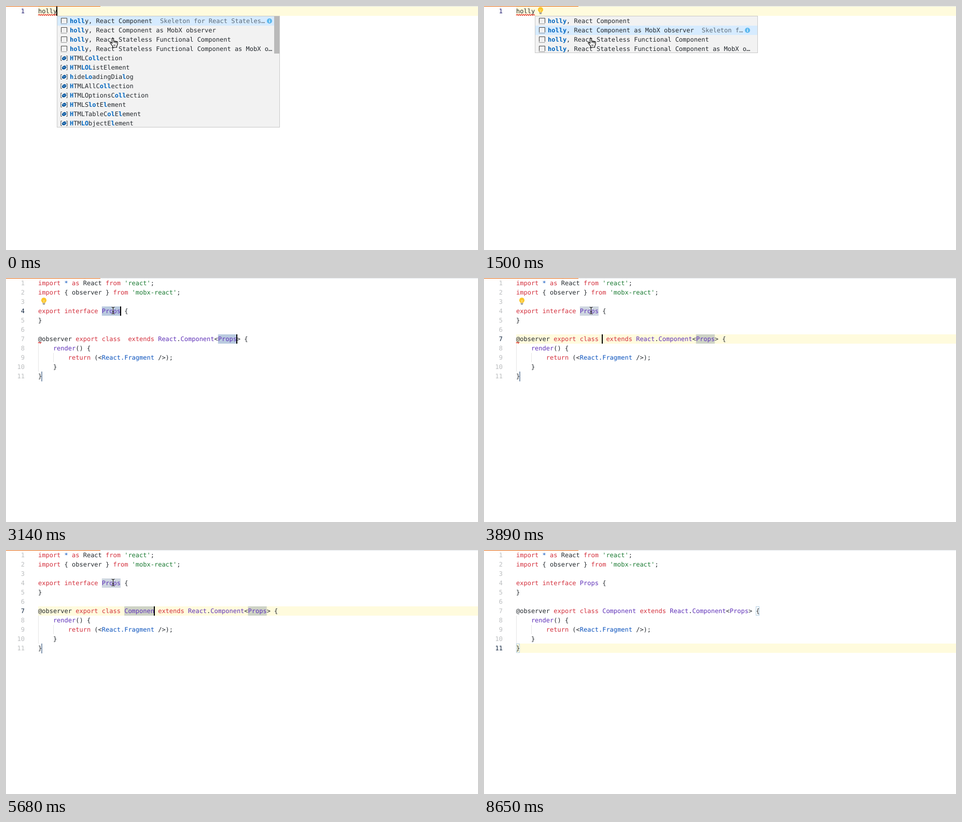
Recreate the animation shown at these times as an HTML page with a canvas. Size 910 by 472 pixels, loop 8.75 s.

```html
<!DOCTYPE html>
<html lang="en">
<head>
<meta charset="utf-8">
<title>Snippet completion</title>
<style>
html, body { margin: 0; width: 100%; height: 100%; overflow: hidden; background: #fff; }
canvas { display: block; }
</style>
</head>
<body>
<canvas id="stage" width="910" height="472"></canvas>
<script>
const ctx = document.getElementById('stage').getContext('2d');
ctx.textRendering = 'geometricPrecision';

const LOOP = 8750, LEFT = 62, ROW = 18, CHAR = 7.224;
const FONT = '12px "DejaVu Sans Mono", monospace';
const COLORS = {
  k: '#24292e', r: '#d32f3c', g: '#1a7a32', p: '#5f32b8', b: '#0a52bd',
  B: '#0066bf', d: '#5d6b78', n: '#bcbec0', a: '#10253f', i: '#1f1a6e'
};

// Moments at which the caret switches between shown and hidden
const BLINKS = [600, 1050, 1500, 2100, 2550, 2840, 3290, 3890, 4340, 4640,
  6880, 7470, 7920, 8370, 8650];
const KEYS = [[4640, 1], [4790, 2], [4940, 3], [5090, 4], [5240, 5],
  [5530, 6], [5680, 8], [5830, 9]];
const MOUSE = [[0, [206, 63]], [7030, [467, 155]], [7180, [700, 330]],
  [7320, [850, 440]], [7470, [886, 464]], [7920, null]];

// Each run starts with its colour key
const SNIPPETS = [
  ['k, React Component', 'Skeleton for React Stateles…'],
  ['k, React Component as MobX observer', 'Skeleton f…'],
  ['k, React Stateless Functional Component'],
  ['k, React Stateless Functional Component as MobX o…']
];
const SYMBOLS = [
  ['BH', 'kTMLC', 'Boll', 'kection'],
  ['BH', 'kTM', 'BLOL', 'kistElement'],
  ['Bh', 'kide', 'BLo', 'kadingDia', 'Bl', 'kog'],
  ['BH', 'kTMLAllC', 'Boll', 'kection'],
  ['BH', 'kTMLOptionsC', 'Boll', 'kection'],
  ['BH', 'kTMLS', 'Blo', 'ktE', 'Bl', 'kement'],
  ['BH', 'kTMLTableC', 'Bol', 'kE', 'Bl', 'kement'],
  ['BH', 'kTM', 'BLO', 'kbjectE', 'Bl', 'kement']
];
const codeLines = name => [
  ['rimport ', 'b* ', 'ras ', 'kReact ', 'rfrom ', "g'react'", 'k;'],
  ['rimport ', 'k{ observer } ', 'rfrom ', "g'mobx-react'", 'k;'],
  [],
  ['rexport interface ', 'pProps ', 'k{'],
  ['k}'],
  [],
  ['k@observer ', 'rexport class ', 'p' + name, 'r extends ', 'pReact', 'k.',
    'pComponent', 'k<', 'pProps', 'k> {'],
  ['k    ', 'prender', 'k() {'],
  ['k        ', 'rreturn ', 'k(<', 'bReact.Fragment', 'k />);'],
  ['k    }'],
  ['k}']
];

const lineY = line => 1 + ROW * (line - 1);
const colX = col => LEFT + col * CHAR;
const latest = (steps, t, first) => steps.reduce((v, [start, next]) => t >= start ? next : v, first);

function rect(x, y, w, h, color) {
  ctx.fillStyle = color;
  ctx.fillRect(x, y, w, h);
}

function stroke(d, color, width = 1) {
  ctx.strokeStyle = color;
  ctx.lineWidth = width;
  ctx.stroke(new Path2D(d));
}

function fill(d, color) {
  ctx.fillStyle = color;
  ctx.fill(new Path2D(d));
}

function runs(list, x, y) {
  for (const run of list) {
    const text = run.slice(1);
    ctx.font = (run[0] === 'B' ? 'bold ' : '') + FONT;
    ctx.fillStyle = COLORS[run[0]];
    ctx.fillText(text, x, y);
    x += text.length * CHAR;
  }
  return x;
}

function lineNumber(n, key) {
  runs([key + n], 36 - String(n).length * CHAR, lineY(n) + 13);
}

function drawAt(x, y, paint) {
  ctx.save();
  ctx.translate(x, y);
  paint();
  ctx.restore();
}

function caret(line, col) {
  rect(Math.round(colX(col)) - 1, lineY(line), 2, ROW, '#000');
}

function squiggle(cols, line) {
  const y = lineY(line) + 15, end = colX(cols);
  let d = `M${LEFT} ${y + 2}`;
  for (let x = LEFT + 2, up = true; x <= end; x += 2, up = !up) d += `L${x} ${y + (up ? 0 : 2.4)}`;
  stroke(d, '#e02020', 1.1);
}

function bulb(x, line) {
  drawAt(x, lineY(line), () => {
    fill('M0 1A5 5 0 0 1 3 10L2.4 11.5H-2.4L-3 10A5 5 0 0 1 0 1Z', '#fbc62c');
    stroke('M-2 6L0 7.5L2 6M0 7.5V11', '#fff0a8', .9);
    rect(-2.5, 11.5, 5, 1.2, '#8c8c8c');
    rect(-2, 13.2, 4, 1.2, '#777');
  });
}

function mark(line, col, cols, color = 'rgba(10,50,100,.2)') {
  rect(colX(col), lineY(line), cols * CHAR, ROW, color);
}

function bracket(line, col) {
  ctx.strokeStyle = '#b3cfe3';
  ctx.lineWidth = 1;
  ctx.strokeRect(Math.round(colX(col)) + .5, lineY(line) + .5, 6, ROW - 1);
}

function snippetIcon(y) {
  rect(107, y + 4, 10, 9, '#f0f0f0');
  stroke(`M106.5 ${y + 13}V${y + 3.5}H117.5V${y + 13}`, '#424242');
  for (let x = 106; x < 118; x += 2) rect(x, y + 14, 1, 1, '#424242');
}

function symbolIcon(y) {
  drawAt(105, y, () => {
    stroke('M3 4.5H.8V13.5H3M11 4.5H13.2V13.5H11', '#555');
    fill('M3 8L7.5 5L11.2 6.5V10L6.8 13L3 11.4Z', '#00539c');
    stroke('M4 8.4L6.8 9.5L10.3 7.2', '#e8f1f8', .8);
  });
}

function infoIcon(y) {
  fill(`M503 ${y + 9}a5 5 0 1 0 10 0a5 5 0 1 0 -10 0`, '#5cb8ee');
  rect(507.4, y + 6, 1.3, 1.3, '#fff');
  rect(507.4, y + 8, 1.3, 4, '#fff');
}

function popup(full, selected) {
  const height = full ? 216 : 72;
  ctx.save();
  ctx.beginPath();
  ctx.rect(98, 19, 430, height);
  ctx.clip();
  rect(98, 19, 430, height, '#f2f2f2');
  rect(99, 20 + selected * ROW, 428, ROW, '#d6ebff');
  SNIPPETS.forEach(([label, detail], i) => {
    const y = 20 + i * ROW;
    snippetIcon(y);
    const prefix = full ? ['Bholl', 'ky'] : ['Bholly'];
    const x = runs([...prefix, label], 123, y + 13);
    if (i === selected) {
      runs(['d' + detail], x + 15, y + 13);
      infoIcon(y);
    }
  });
  if (full) {
    SYMBOLS.forEach((item, i) => {
      const y = 20 + (i + 4) * ROW;
      symbolIcon(y);
      runs(item, 123, y + 13);
    });
    rect(517, 20, 10, 72, '#b9b9b9');
  }
  ctx.strokeStyle = '#c8c8c8';
  ctx.lineWidth = 1;
  ctx.strokeRect(98.5, 19.5, 429, height - 1);
  ctx.restore();
}

function hand(x, y) {
  drawAt(x, y, () => {
    const d = 'M-1.5 9L-3.8 7.2C-5 6.6-5.6 8-4.8 9L-.5 14.5V17H7.5V14.5L9 11V6.8' +
      'C9 5.2 6.8 5.2 6.6 6.5C6.4 4.7 4.2 4.7 4 6C3.6 4.3 1.6 4.5 1.5 5.5V1' +
      'C1.5-1.2-1.5-1.2-1.5 1Z';
    fill(d, '#fff');
    stroke(d, '#000', 1.2);
    stroke('M1.5 5.5V8M4 6V8.5M6.6 6.5V9M2 11.5V14.5M4.2 11.5V14.5', '#000', .9);
  });
}

function beam(x, y) {
  drawAt(x + .5, y, () => {
    const d = 'M-3-6.5H-1.5L0-5.5L1.5-6.5H3M0-5.5V5.5M-3 6.5H-1.5L0 5.5L1.5 6.5H3M-1.5 2.5H1.5';
    stroke(d, 'rgba(255,255,255,.8)', 2.6);
    stroke(d, '#000', 1.1);
  });
}

function drawPrompt(t, caretOn) {
  rect(LEFT, 1, 848, ROW, '#fffbdd');
  lineNumber(1, 'i');
  runs(['kholly'], LEFT, 14);
  squiggle(5, 1);
  if (t >= 750) bulb(109, 1);
  if (caretOn) caret(1, 5);
  popup(t < 150, t < 1350 ? 0 : 1);
}

function drawCode(t, caretOn) {
  const name = 'Component'.slice(0, latest(KEYS, t, 0));
  const propsCol = 48 + name.length;
  const active = t < 3890 ? 4 : t < 6430 ? 7 : 11;

  if (active !== 4) rect(LEFT, lineY(active), 848, ROW, '#fffbdd');
  if (active !== 11) {
    mark(4, 17, 5);
    mark(7, propsCol, 5);
    mark(7, 23, name.length);
    rect(68, 181, 2, 19, 'rgba(10,50,100,.5)');
  }
  if (active === 4) {
    mark(4, 17, 5, 'rgba(3,102,214,.1)');
    mark(7, 48, 5, 'rgba(3,102,214,.1)');
  }
  rect(LEFT, 127, 1, 54, '#e6e6e6');
  rect(91, 145, 1, ROW, '#e6e6e6');
  if (active === 11) {
    bracket(7, 64);
    bracket(11, 0);
  }

  codeLines(name).forEach((line, i) => {
    lineNumber(i + 1, i + 1 === active ? 'a' : 'n');
    runs(line, LEFT, lineY(i + 1) + 13);
  });

  if (t >= 3140 && t < 5530) squiggle(1, 7);
  if (t < 3140) bulb(109, 1);
  else if (t < 4190) bulb(73, 3);

  if (!caretOn) return;
  if (active === 4) {
    caret(4, 22);
    caret(7, 53);
  } else if (active === 7) caret(7, 23 + name.length);
  else caret(11, 1);
}

function draw(t) {
  rect(0, 0, 910, 472, '#fff');
  const caretOn = BLINKS.filter(b => t >= b).length % 2 === 0;
  (t < 2840 ? drawPrompt : drawCode)(t, caretOn);
  rect(0, 0, 910, 1, '#e1e4e8');
  rect(0, 0, 182, 1, '#e36209');
  const mouse = latest(MOUSE, t, null);
  if (mouse) (t < 2700 ? hand : beam)(...mouse);
}

function frame() {
  draw(performance.now() % LOOP);
  requestAnimationFrame(frame);
}
frame();
</script>
</body>
</html>
```
